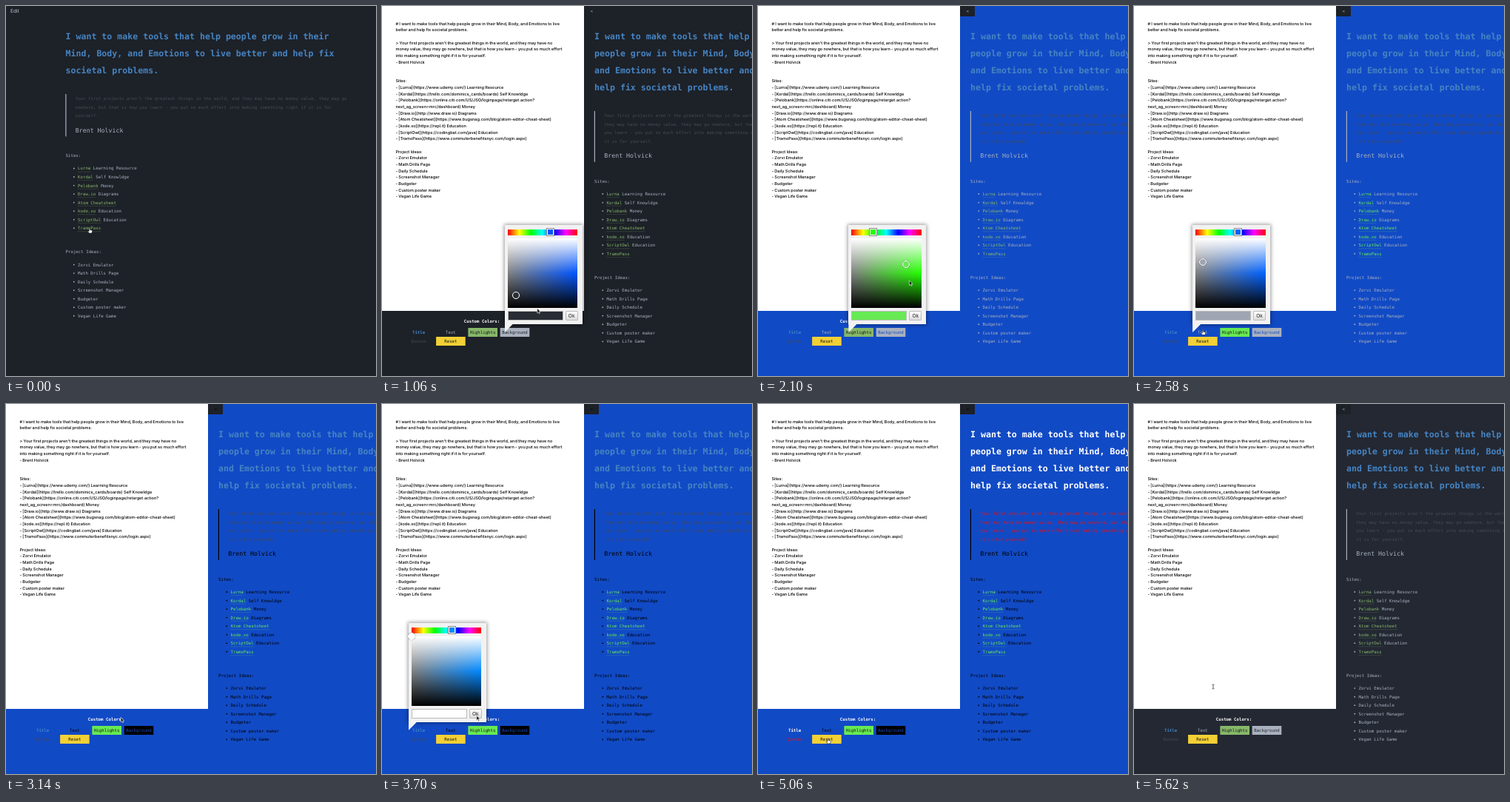
These frames come from a looping animation (500 px wide and 500 px high, 5680 ms). An HTML page:

```html
<!DOCTYPE html>
<html lang="en">
<head>
<meta charset="utf-8">
<title>Markdown notes with custom colors</title>
<style>
  html, body { margin: 0; width: 100%; height: 100%; overflow: hidden; }
  #stage { position: relative; width: 500px; height: 500px; overflow: hidden; background: var(--bg); }
  svg { position: absolute; left: 0; top: 0; }
  text { white-space: pre; text-rendering: geometricPrecision; }
  .mono { font-family: "DejaVu Sans Mono", "Liberation Mono", monospace; font-size: 5.76px; fill: var(--text); }
  .sans { font: 500 5.57px Inter, "Liberation Sans", sans-serif; word-spacing: -.2px; fill: #000; }
  .title { font-size: 11.6px; font-weight: bold; fill: var(--title); }
  .quote { fill: var(--quotes); }
  .author { font-size: 8.25px; }
  .link { fill: var(--highlights); }
  .line { stroke: var(--highlights); stroke-width: .6; stroke-dasharray: 1 .6; opacity: .55; }
  .mid { text-anchor: middle; }

  #picker {
    position: absolute; width: 105px; height: 134px; background: #f2f2f2;
    box-shadow: 0 0 5px 1px rgba(0, 0, 0, .4);
  }
  #picker div { position: absolute; box-sizing: border-box; }
  #picker .tail { left: 0; top: 133px; width: 12px; height: 12px; background: #f2f2f2; clip-path: polygon(0 0, 100% 0, 0 100%); }
  #picker .hues {
    left: 4px; top: 5.5px; width: 94.5px; height: 8px;
    background: linear-gradient(to right, red, yellow, lime, cyan, blue, magenta, red);
  }
  #picker .hue { top: 5px; width: 9px; height: 9px; border: 1px solid #fff; outline: .5px solid #888; background: hsl(var(--h) 100% 50%); }
  #picker .area {
    left: 4px; top: 17.5px; width: 94.5px; height: 94.5px;
    background: linear-gradient(#fff, transparent 50%, #000), linear-gradient(to right, #808080, hsl(var(--h) 100% 50%));
  }
  #picker .knob { width: 10px; height: 10px; border: 1.5px solid #fff; border-radius: 50%; background: var(--pick); box-shadow: 0 0 1px #555; }
  #picker .field { left: 4px; top: 116px; width: 75px; height: 13px; border: .5px solid #bbb; background: var(--pick); }
  #picker .ok {
    left: 82px; top: 116px; width: 17px; height: 13px; border: .5px solid #bbb; border-radius: 1px;
    background: linear-gradient(#fff, #ddd); color: #222; text-align: center;
    font: 6.6px/12px Inter, "Liberation Sans", sans-serif;
  }
</style>
</head>
<body>
<div id="stage">
  <svg id="page" width="500" height="500"></svg>
  <div id="picker">
    <div class="tail"></div><div class="hues"></div><div class="hue"></div>
    <div class="area"></div><div class="knob"></div>
    <div class="field"></div><div class="ok">Ok</div>
  </div>
  <svg width="500" height="500">
    <g id="cursor" stroke-linejoin="round">
      <path data-kind="arrow" d="M0 0V6.4L1.5 5.1 2.6 7.4 3.7 6.9 2.7 4.7H4.6Z" fill="#111" stroke="#fff" stroke-width=".6"/>
      <path data-kind="hand" d="M-.8 .5Q0-.6 .6 .5V2.6L3 3.1Q3.8 3.4 3.6 4.6L2.9 7H-.6L-2.6 4.4Q-2.2 3.4-.8 4.4Z" fill="#fff" stroke="#111" stroke-width=".6"/>
      <path data-kind="beam" d="M-1.5-3Q0-3 0-2.2Q0-3 1.5-3M0-2.2V2.2M-1.5 3Q0 3 0 2.2Q0 3 1.5 3" fill="none" stroke="#222" stroke-width=".7"/>
    </g>
  </svg>
</div>
<script>
const LOOP = 5680, SPLIT = 400, RESET = 5260;
const DARK = '#1d2128';
const $ = s => document.querySelector(s);
const stage = $('#stage'), picker = $('#picker'), cursor = $('#cursor');

const heading = 'I want to make tools that help people grow in their Mind, Body, and Emotions to live better and help fix societal problems.';
const quote = "Your first projects aren't the greatest things in the world, and they may have no money value, they may go nowhere, but that is how you learn - you put so much effort into making something right if it is for yourself.";
const author = 'Brent Holvick';
const sites = [
  ['Lurna', 'Learning Resource', 'https://www.udemy.com/'],
  ['Kordal', 'Self Knowldge', 'https://trello.com/dominics_cards/boards'],
  ['Pelobank', 'Money', 'https://online.citi.com/US/JSO/loginpage/retarget.action?\nnext_ag_screen=mrc/dashboard'],
  ['Draw.io', 'Diagrams', 'http://www.draw.io'],
  ['Atom Cheatsheet', '', 'https://www.bugsnag.com/blog/atom-editor-cheat-sheet'],
  ['kode.xo', 'Education', 'https://repl.it'],
  ['ScriptOwl', 'Education', 'https://codingbat.com/java'],
  ['TramoPass', '', 'https://www.commuterbenefitsnyc.com/login.aspx']
];
const ideas = ['Zorvi Emulator', 'Math Drills Page', 'Daily Schedule', 'Screenshot Manager',
  'Budgeter', 'Custom poster maker', 'Vegan Life Game'];

// Breaks a sentence into lines of at most `max` characters.
function wrap(s, max) {
  const lines = [''];
  for (const word of s.split(' ')) {
    const last = lines.at(-1), joined = last ? last + ' ' + word : word;
    if (joined.length > max) lines.push(word);
    else lines[lines.length - 1] = joined;
  }
  return lines;
}

const text = (x, y, cls, s) => `<text x="${x}" y="${y}" class="${cls}">${s}</text>`;
const rect = (x, y, w, h, fill) => `<rect x="${x}" y="${y}" width="${w}" height="${h}" style="fill:${fill}"/>`;
const label = (x, y, s, fill, weight = 'normal') =>
  `<text x="${x}" y="${y}" class="mono mid" style="fill:${fill};font-weight:${weight}">${s}</text>`;

// Rendered notes with left margin x, wrapped to the given line lengths.
function notes(x, headMax, quoteMax) {
  const row = 11.53, head = wrap(heading, headMax), words = wrap(quote, quoteMax);
  const top = 44.5 + head.length * 23, below = top + words.length * row;
  const bullet = y => `<circle cx="${x + 11.3}" cy="${y - 2}" r=".9" style="fill:var(--text)"/>`;
  let out = head.map((s, i) => text(x, 44.8 + i * 23, 'mono title', s)).join('');
  out += rect(x - .2, top + 5.5, 1.2, below - top + 22.7, 'var(--text)');
  out += words.map((s, i) => text(x + 13.3, top + 13.5 + i * row, 'mono quote', s)).join('');
  out += text(x + 13.3, below + 22.7, 'mono author', author);
  out += text(x, below + 56, 'mono', 'Sites:');
  sites.forEach(([name, note], i) => {
    const y = below + 73.4 + i * row;
    out += bullet(y) + text(x + 16.5, y, 'mono', `<tspan class="link">${name}</tspan> ${note}`) +
      `<path class="line" d="M${x + 16.5} ${y + 2.6}h${name.length * 3.468}"/>`;
  });
  out += text(x, below + 186, 'mono', 'Project Ideas:');
  ideas.forEach((s, i) => {
    const y = below + 203.5 + i * row;
    out += bullet(y) + text(x + 16.5, y, 'mono', s);
  });
  return out;
}

const markdown = [...wrap('# ' + heading, 86), '', ...wrap('> ' + quote, 86), '- ' + author, '', '', 'Sites:',
  ...sites.flatMap(([name, note, url]) => `- [${name}](${url}) ${note}`.split('\n')),
  '', 'Project Ideas:', ...ideas.map(s => '- ' + s)];

// Buttons sit in a grid; each picker hangs above its button.
const cell = (col, row = 0) => ({ x: 29.8 + col * 43.3, y: 435 + row * 12 });
function button(col, row, s, fill, back, weight) {
  const { x, y } = cell(col, row);
  return (back ? rect(x, y, 39.6, 12, back) : '') + label(x + 19.8, y + 8.1, s, fill, weight);
}

$('#page').innerHTML =
  '<g id="full">' + rect(0, 0, 24, 14, DARK) +
  '<text x="6" y="9" class="sans" style="font-size:6.6px;font-weight:400;fill:#c3c7ce">Edit</text>' +
  notes(80.5, 52, 107) +
  '</g><g id="split">' + rect(0, 0, 273, 412, '#fff') +
  markdown.map((s, i) => text(18.5, 25.6 + i * 8.65, 'sans', s.replace('>', '&gt;'))).join('') +
  rect(273, 0, 20, 14, DARK) + label(283.3, 9.2, '&lt;', 'var(--text)') +
  notes(287, 32, 67) +
  label(135, 427.5, 'Custom Colors:', '#fff', 'bold') +
  button(0, 0, 'Title', 'var(--title)', '', 'bold') +
  button(1, 0, 'Text', 'var(--text)') +
  button(2, 0, 'Highlights', '#111', 'var(--highlights)') +
  button(3, 0, 'Background', 'var(--bg)', 'var(--text)') +
  button(0, 1, 'Quotes', 'var(--quotes)') +
  button(1, 1, 'Reset', '#111', '#f3d035') + '</g>';

const base = { bg: DARK, title: '#4684c2', text: '#a9b1be', highlights: '#87b86a', quotes: '#484c53' };

// One entry per colour change; from and to are [hue, saturation, lightness].
const sessions = [
  { name: 'bg', at: cell(3), open: 880, pick: 1230, from: [220, .12, .18], to: [221, .84, .42] },
  { name: 'highlights', at: cell(2), open: 1770, pick: 2000, from: [98, .36, .57], to: [112, .78, .62] },
  { name: 'text', at: cell(1), open: 2500, pick: 2860, from: [217, .11, .66], to: [217, .12, 0] },
  { name: 'title', at: cell(0), open: 3330, pick: 3500, from: [208, .5, .52], to: [208, 0, 1] },
  { name: 'quotes', at: cell(0, 1), open: 4180, pick: 4570, from: [0, 0, .34], to: [0, .88, .5] }
];
const SIDE = 94.5;
const knobAt = ([, s, l]) => [4 + s * SIDE, 17.5 + (1 - l) * SIDE];
const hsl = ([h, s, l]) => `hsl(${h} ${s * 100}% ${l * 100}%)`;
for (const s of sessions) {
  s.left = s.at.x + 6;
  s.top = s.at.y - 139;
  s.close = s.pick + 220;
}

// Pointer path as [time, x, y]; every stop lasts until `leave`.
const path = [];
const stop = (arrive, leave, x, y) => path.push([arrive, x, y], [leave, x, y]);
stop(0, 60, 113, 300);
stop(340, 460, 10, 8);
for (const s of sessions) {
  const [kx, ky] = knobAt(s.to);
  stop(s.open - 50, s.open + 40, s.at.x + 20, s.at.y + 4);
  stop(s.pick, s.pick + 50, s.left + kx, s.top + ky);
  stop(s.close - 30, s.close + 20, s.left + 92, s.top + 125);
}
stop(5100, RESET, 93, 453);
stop(5600, LOOP, 107, 382);

const mix = (a, b, p) => a + (b - a) * p;
function span(t, a, b) {
  const p = Math.min(1, Math.max(0, (t - a) / (b - a)));
  return p * p * (3 - 2 * p);
}

function pointer(t) {
  const i = path.findIndex(k => k[0] > t);
  const [a, x, y] = path[i - 1], [b, x2, y2] = path[i];
  const p = span(t, a, b);
  return [mix(x, x2, p), mix(y, y2, p)];
}

function pointerKind(t, x, y, open) {
  if (t < SPLIT) return t < 90 || t > 320 ? 'hand' : 'arrow';
  if (open && x >= open.left - 2 && x < open.left + 105 && y >= open.top && y < open.top + 134) return 'arrow';
  if (x < 273 && y < 412) return 'beam';
  return x > 30 && x < 199 && y > 435 && y < 459 ? 'hand' : 'arrow';
}

function drawPicker(t, { pick, left, top, from, to }) {
  const p = span(t, pick, pick + 40);
  const color = from.map((v, i) => mix(v, to[i], p));
  const [x, y] = knobAt(color);
  picker.style.left = left + 'px';
  picker.style.top = top + 'px';
  picker.style.setProperty('--h', color[0]);
  picker.style.setProperty('--pick', hsl(color));
  $('.hue').style.left = color[0] / 360 * SIDE - .5 + 'px';
  $('.knob').style.left = x - 5 + 'px';
  $('.knob').style.top = y - 5 + 'px';
}

function draw(t) {
  const colors = { ...base };
  if (t >= RESET) colors.bg = '#232833';
  else for (const s of sessions) if (t >= s.close) colors[s.name] = hsl(s.to);
  for (const name in colors) stage.style.setProperty('--' + name, colors[name]);
  $('#full').style.display = t < SPLIT ? '' : 'none';
  $('#split').style.display = t < SPLIT ? 'none' : '';

  const open = sessions.find(s => t >= s.open && t < s.close);
  picker.style.display = open ? '' : 'none';
  if (open) drawPicker(t, open);

  const [x, y] = pointer(t), kind = pointerKind(t, x, y, open);
  cursor.setAttribute('transform', `translate(${x} ${y})`);
  for (const shape of cursor.children) shape.style.display = shape.dataset.kind === kind ? '' : 'none';
}

const start = performance.now();
function tick() {
  draw((performance.now() - start) % LOOP);
  requestAnimationFrame(tick);
}
tick();
</script>
</body>
</html>
```
